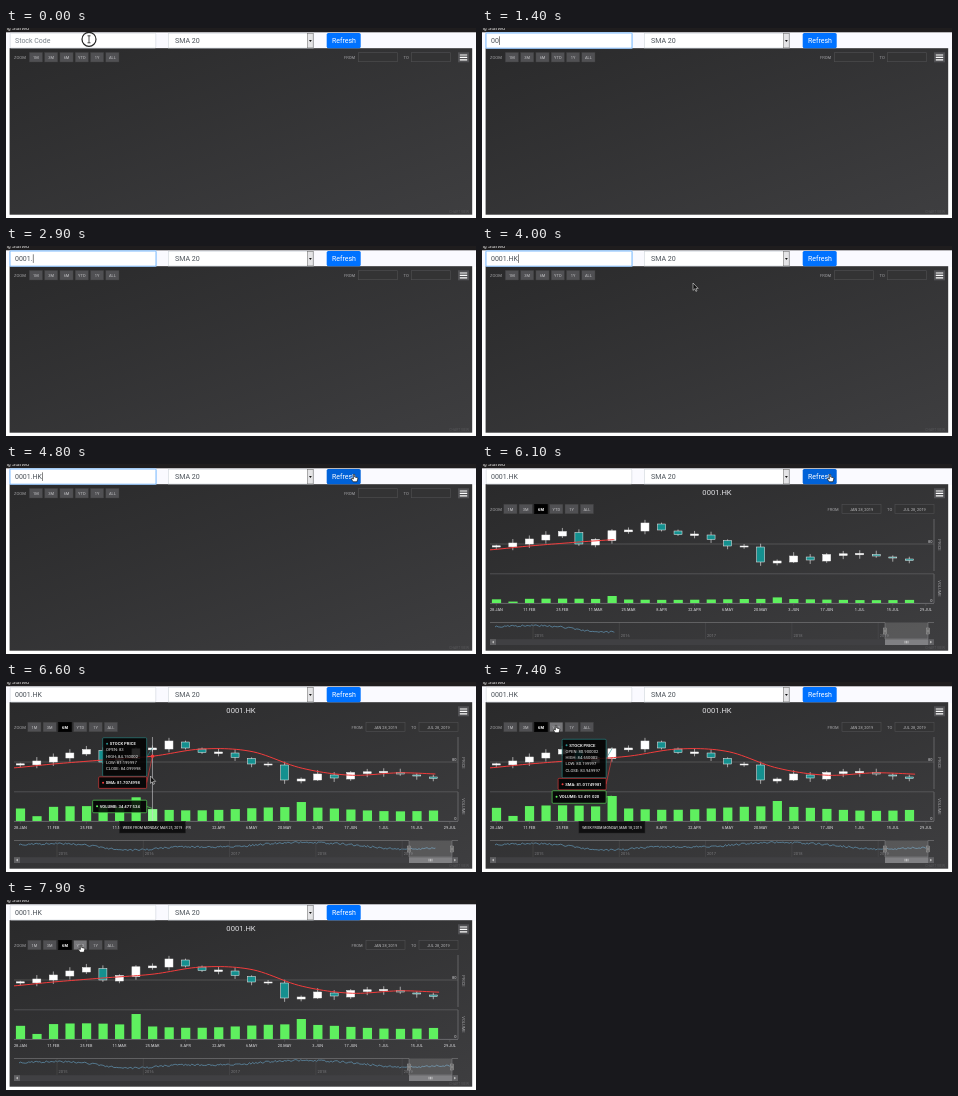
Animation, 470 px wide and 190 px high, one loop 8 s. Source, as an HTML page:

```html
<!DOCTYPE html>
<html lang="en">
<head>
<meta charset="utf-8">
<title>Stock chart</title>
<style>
  html, body { margin: 0; width: 100%; height: 100%; overflow: hidden; background: #fff; }
  svg { display: block; width: 470px; height: 190px; font-family: Roboto, "Open Sans", sans-serif; }
  text { white-space: pre; }
</style>
</head>
<body>
<svg id="stage" viewBox="0 0 470 190"></svg>
<script>
const LOOP = 8000, STEP = 100;
const stage = document.getElementById('stage');

function el(parent, tag, attrs = {}, text) {
  const node = document.createElementNS('http://www.w3.org/2000/svg', tag);
  set(node, attrs);
  if (text !== undefined) node.textContent = text;
  return parent.appendChild(node);
}
function set(node, attrs) {
  for (const key in attrs) node.setAttribute(key, attrs[key]);
}
const group = (parent, attrs) => el(parent, 'g', attrs);
const rect = (parent, x, y, width, height, fill, more) =>
  el(parent, 'rect', { x, y, width, height, fill, ...more });
const path = (parent, d, stroke, width = 0.6, fill = 'none') =>
  el(parent, 'path', { d, stroke, 'stroke-width': width, fill, 'stroke-linejoin': 'round' });
const label = (parent, x, y, size, fill, text, more) =>
  el(parent, 'text', { x, y, 'font-size': size, fill, ...more }, text);
const show = (node, on) => set(node, { visibility: on ? 'visible' : 'hidden' });
const clamp = (v, lo = 0, hi = 1) => Math.min(hi, Math.max(lo, v));
const range = (n, make) => Array.from({ length: n }, (_, i) => make(i));
const MID = { 'text-anchor': 'middle' };

// Smooth curve through evenly spaced values; k counts in spacings.
function spline(values, k) {
  const n = clamp(Math.floor(k), 0, values.length - 2), u = k - n;
  const at = i => values[clamp(i, 0, values.length - 1)];
  const [a, b, c, d] = [at(n - 1), at(n), at(n + 1), at(n + 2)];
  return b + u / 2 * (c - a + u * (2 * a - 5 * b + 4 * c - d + u * (3 * (b - c) + d - a)));
}
function random(seed) {
  return () => (seed = (seed * 16807) % 2147483647) / 2147483647;
}

/* ---------- page and form ---------- */
const defs = el(stage, 'defs');
const gradient = el(defs, 'linearGradient', { id: 'panel', x1: 0, y1: 0, x2: 1, y2: 1 });
el(gradient, 'stop', { offset: 0, 'stop-color': '#2a2a2b' });
el(gradient, 'stop', { offset: 1, 'stop-color': '#3e3e40' });
const reveal = rect(el(defs, 'clipPath', { id: 'reveal' }), 8, 50, 0, 130);

rect(stage, 0, 4, 470, 17, '#fafaff');
rect(stage, 0, 0, 470, 4.3, '#1f1d1e');
label(stage, -1, 1.6, 5.2, '#ddd', 'ng Started');
rect(stage, 3.6, 20.2, 462.6, 166.5, 'url(#panel)');

const ring = rect(stage, 3.2, 4.2, 147.6, 16.6, '#a9d2ff', { rx: 1.5 });
const field = rect(stage, 4.2, 5.2, 145.6, 14.8, '#fff', { rx: 1, 'stroke-width': 0.6 });
const fieldText = label(stage, 9, 15.2, 7, '#495057', '');
const caret = rect(stage, 0, 8.3, 0.6, 8.6, '#333');

rect(stage, 162.3, 5.2, 145, 14.8, '#fff', { stroke: '#ced4da', 'stroke-width': 0.6 });
label(stage, 169, 15.2, 7.1, '#495057', 'SMA 20');
rect(stage, 301.6, 5.3, 5.6, 14.6, '#e4e4e6', { stroke: '#777', 'stroke-width': 0.6 });
path(stage, 'M303 12h2.8l-1.4 1.9z', 'none', 0, '#111');

const button = rect(stage, 320.7, 5, 34, 15.2, '#0072ff', { rx: 1.6 });
label(stage, 337.9, 15.2, 7, '#fff', 'Refresh', MID);

/* ---------- chart toolbar ---------- */
function toolbar(parent, x, y, selected, from, dates) {
  label(parent, 8, y + 6.6, 4.2, '#a0a0a3', 'ZOOM');
  const boxes = ['1M', '3M', '6M', 'YTD', '1Y', 'ALL'].map((name, i) => {
    const on = i === selected;
    const box = rect(parent, x + i * 15.3, y, 13.2, 9.6, on ? '#000' : '#505053',
      { stroke: on ? '#000' : '#3c3c3e', 'stroke-width': 0.4 });
    label(parent, x + i * 15.3 + 6.6, y + 6.4, 4, on ? '#fff' : '#c0c0c3', name,
      { ...MID, 'font-weight': on ? 700 : 400 });
    return box;
  });
  [['FROM', from, from + 14.5], ['TO', from + 59.5, from + 67.5]].forEach(([name, tx, bx], i) => {
    label(parent, tx, y + 6.4, 4.1, '#a0a0a3', name);
    rect(parent, bx, y + 0.3, 39, 9, '#333334', { stroke: '#505053', 'stroke-width': 0.6 });
    label(parent, bx + 19.5, y + 6.4, 3.9, '#b8b8ba', dates[i], MID);
  });
  return boxes;
}
const idle = group(stage);
toolbar(idle, 23.3, 24.4, -1, 338, ['', '']);
const chart = group(stage);
const zoomBoxes = toolbar(chart, 21.8, 40.2, 2, 345.5, ['JAN 28, 2019', 'JUL 28, 2019']);

rect(stage, 452, 24.3, 11, 10, '#505053');
path(stage, 'M453.8 27h7.4M453.8 29.4h7.4M453.8 31.8h7.4', '#fff', 1.2);
label(stage, 463, 185.3, 3.4, '#58585a', 'CHART VIEW', { 'text-anchor': 'end' });

/* ---------- chart data ---------- */
const BASE = 139, PRICE_SCALE = 3.4, WEEKS = 26;
const MONTHS = ['JAN', 'FEB', 'MAR', 'APR', 'MAY', 'JUN', 'JUL'];
const noise = random(41);
const xAt = week => 14.3 + week * 16.52;
const priceAt = y => 80 + (80 - y) / PRICE_SCALE;
const dayOf = week => {
  const date = new Date(Date.UTC(2019, 0, 28 + week * 7));
  return [date.getUTCDate(), MONTHS[date.getUTCMonth()]];
};

// Heights of the weekly closes; each week opens just below the last close.
const closes = [81.8, 79, 75, 71, 67.5, 80, 75.5, 66.8, 66, 59, 66, 70.5, 70, 75.5, 82, 82,
  98, 97, 92, 96, 90.5, 89.8, 89.4, 92, 94, 96.5];
const candles = closes.map((close, i) => {
  const open = (i ? closes[i - 1] : 82) + 1;
  return {
    open, close,
    high: Math.min(open, close) - 1 - noise() * 3,
    low: Math.max(open, close) + 1 + noise() * 3
  };
});
const spikes = { 1: -9, 7: 11.4, 17: 5.4 };
const volumes = range(WEEKS, i => 14 - 0.08 * i + 2 * Math.cos((i - 4) / 2) + (spikes[i] || 0));
const smaKeys = [86.5, 82, 78, 74.2, 67, 69.5, 86, 93.2, 90.8, 92.5];
const smaY = week => spline(smaKeys, (week + 1) / 3);
const navKeys = [162.5, 162, 168, 165, 164.5, 160.5, 162, 167, 165.5];

/* ---------- chart ---------- */
label(chart, 235, 31, 7.6, '#e0e0e3', '0001.HK', MID);
path(chart, 'M8 80H452M8 109.8H452', '#707073', 0.5);
path(chart, 'M452 55V107M452 110V139', '#707073', 0.8);
path(chart, 'M8 139.4H452', '#8a8a8d', 0.6);
[['80', 78.8], ['0', 138]].forEach(([text, y]) =>
  label(chart, 450.5, y, 4, '#d0d0d3', text, { 'text-anchor': 'end' }));
[['PRICE', 81], ['VOLUME', 124.5]].forEach(([name, y]) =>
  label(chart, 0, 0, 4.2, '#a0a0a3', name, { ...MID, transform: `translate(456 ${y}) rotate(90)` }));
for (let week = 0; week <= WEEKS; week += 2) {
  label(chart, xAt(week), 147.4, 3.9, '#e0e0e3', dayOf(week).join('.'), MID);
  path(chart, `M${xAt(week)} 139.4v2.4`, '#707073', 0.4);
}

const bars = volumes.map((_, i) => rect(chart, xAt(i) - 4.4, BASE, 9.2, 0, '#5ff05f'));
candles.forEach(({ open, close, high, low }, i) => {
  const x = xAt(i);
  path(chart, `M${x} ${high}V${low}`, '#f0f0f0', 0.6);
  rect(chart, x - 4, Math.min(open, close), 8, Math.abs(close - open),
    close < open ? '#fff' : '#14908f', { stroke: '#f0f0f0', 'stroke-width': 0.5 });
});
const revealed = group(chart, { 'clip-path': 'url(#reveal)' });
const smaPoints = range(WEEKS * 4, n => `${xAt(n / 4 - 0.4)} ${smaY(n / 4 - 0.4)}`);
path(revealed, 'M' + smaPoints.join('L'), '#f23c3c', 1);

/* ---------- navigator ---------- */
for (let i = 0; i < 5; i++) {
  const x = 51 + i * 86.3;
  path(chart, `M${x} 158.5V175`, '#505053', 0.5);
  label(chart, x + 1.5, 173, 4, '#77777a', String(2015 + i));
}
rect(chart, 403, 158.5, 43, 16.5, 'rgba(255,255,255,.14)');
const navPoints = range(271, n =>
  `${13 + n * 1.6} ${spline(navKeys, n / 270 * (navKeys.length - 1)) + (noise() - 0.5) * 1.8}`);
path(revealed, 'M' + navPoints.join('L'), '#6399b8', 0.7);
path(chart, 'M8 158.5H403V175H446V158.5H452', '#8a8a8d', 0.5);
rect(chart, 8, 175.2, 444, 5.8, '#404043');
rect(chart, 403, 175.2, 43, 5.8, '#808083');
path(chart, 'M423 176.8v2.6M424.5 176.8v2.6M426 176.8v2.6', '#fff', 0.5);
[8, 446].forEach((x, i) => {
  rect(chart, x, 175.2, 6, 5.8, '#606063');
  path(chart, i ? 'M448.2 176.8l1.8 1.3l-1.8 1.3z' : 'M11.8 176.8l-1.8 1.3l1.8 1.3z', 'none', 0, '#ccc');
});
[403, 446].forEach(x => {
  rect(chart, x - 1.7, 164, 3.4, 6, '#666', { stroke: '#aaa', 'stroke-width': 0.4 });
  path(chart, `M${x - 0.5} 165.5v3M${x + 0.5} 165.5v3`, '#ccc', 0.3);
});

/* ---------- tooltip ---------- */
const crosshair = path(chart, '', '#cfcfd2', 0.6);
const dot = el(chart, 'circle', { r: 1.7, fill: '#f23c3c' });
const tip = group(chart);

function tipBox(width, height, color, lines) {
  const g = group(tip);
  const link = path(g, '', color, 0.6);
  rect(g, -width, -height / 2, width, height, 'rgba(0,0,0,.85)',
    { stroke: color, 'stroke-width': 0.6, rx: 1 });
  el(g, 'circle', { cx: 4.4 - width, cy: 6 - height / 2, r: 1, fill: color });
  const texts = range(lines, n =>
    label(g, (n ? 3.4 : 7) - width, 7.5 - height / 2 + n * 6.2, 4.2, '#e8e8e8', '',
      { 'font-weight': n ? 400 : 700 }));
  return { g, link, texts };
}
const stockTip = tipBox(44, 38.5, '#2b908f', 5);
const smaTip = tipBox(48, 11.5, '#f23c3c', 1);
const volumeTip = tipBox(54, 12.5, '#5ff05f', 1);
const dateTip = group(tip);
rect(dateTip, -33, 139.5, 66, 11.5, 'rgba(12,12,13,.9)', { stroke: '#222', 'stroke-width': 0.5 });
const dateText = label(dateTip, 0, 146.8, 3.6, '#f0f0f0', '', MID);

// Exact quotes where known; other weeks are read off the chart.
const quotes = {
  7: { ohlc: ['80.900002', '84.650002', '80.199997', '83.949997'], sma: '81.01749981', volume: '53 491 020' },
  8: { ohlc: ['83', '84.150002', '81.199997', '84.099998'], sma: '81.7074998', volume: '34 477 534' }
};
function quote(i) {
  const { open, high, low, close } = candles[i];
  return quotes[i] || {
    ohlc: [open, high, low, close].map(y => priceAt(y).toFixed(6)),
    sma: priceAt(smaY(i)).toFixed(7),
    volume: Math.round(volumes[i] * 2139641).toLocaleString('en-US').replace(/,/g, ' ')
  };
}

function drawTip(i) {
  const x = xAt(i), q = quote(i), center = Math.max(74, smaY(i) + 0.8), top = BASE - volumes[i];
  const place = (box, y, anchor, lines) => {
    set(box.g, { transform: `translate(${x - 5.8} ${y})` });
    set(box.link, { d: `M0 0L5.8 ${anchor - y}` });
    box.texts.forEach((text, n) => { text.textContent = lines[n]; });
  };
  const rows = ['OPEN', 'HIGH', 'LOW', 'CLOSE'].map((name, n) => `${name}: ${q.ohlc[n]}`);
  place(stockTip, center, candles[i].close, ['STOCK PRICE', ...rows]);
  place(smaTip, center + 25.6, smaY(i), ['SMA: ' + q.sma]);
  place(volumeTip, Math.max(center + 38.5, top - 2), top, ['VOLUME: ' + q.volume]);
  const [day, month] = dayOf(i);
  dateText.textContent = `WEEK FROM MONDAY, ${month} ${day}, 2019`;
  set(dateTip, { transform: `translate(${x} 0)` });
  set(crosshair, { d: `M${x} 55V139` });
  set(dot, { cx: x, cy: smaY(i) });
}

/* ---------- pointer ---------- */
const pointer = group(stage);
const shapes = {
  beam: group(pointer),
  arrow: path(pointer, 'M0 0V7.4L1.7 5.8L2.9 8.4L4 7.9L2.9 5.4H5.2Z', '#fff', 0.5, '#111'),
  hand: path(pointer, 'M-.7 .6Q0-.5 .7 .6V3L3.4 3.6Q4 4 3.8 5L3 7.8H-.9L-2.8 4.9Q-2.6 3.8-.7 5Z', '#111', 0.7, '#fff')
};
const halo = el(shapes.beam, 'circle', { r: 7, fill: 'none', stroke: '#222', 'stroke-width': 1.2 });
path(shapes.beam, 'M-1.5-3.5H1.5M0-3.5V3.5M-1.5 3.5H1.5', '#222', 0.8);

// Each move: start, end, target x and y.
const moves = [[1200, 1300, 211, 37], [4300, 4750, 348, 10], [6250, 6600, 144.5, 94],
  [6600, 7100, 128, 50], [7100, 7350, 74, 43], [7500, 7800, 75, 44.5]];
function pointerAt(t) {
  return moves.reduce(([x, y], [from, to, tx, ty]) => {
    const k = clamp((t - from) / (to - from));
    return [x + (tx - x) * k, y + (ty - y) * k];
  }, [83, 11.3]);
}
const typing = { 1200: '0', 1400: '0', 1600: '0', 1900: '1', 2900: '.', 3300: 'H', 3600: 'K' };
const FOCUS = 100, BLUR = 5200, LOAD = 5500, GROW = 5745, HOVER = 6350, LEAVE = 7050, HIDE = 7550;

function renderForm(t) {
  const times = Object.keys(typing).map(Number).filter(at => at <= t);
  const typed = times.map(at => typing[at]).join('');
  const focused = t >= FOCUS && t < BLUR;
  const focus = focused ? clamp((t - FOCUS + 50) / 150) : 0;
  fieldText.textContent = typed || 'Stock Code';
  set(fieldText, { fill: typed ? '#495057' : '#7b838a' });
  set(ring, { opacity: focus });
  set(field, { stroke: focus > 0.5 ? '#80bdff' : '#ced4da' });
  show(caret, focused && (t - (times.pop() || FOCUS)) % 1000 < 500);
  set(caret, { x: typed ? 9.3 + fieldText.getComputedTextLength() : 9 });
}

function renderPointer(t, px, py) {
  const inside = (x, y, w, h) => px >= x && px <= x + w && py >= y && py <= y + h;
  const onButton = inside(320, 4, 35, 16), onZoom = inside(67.7, 40, 13.2, 10);
  const kind = t < 1200 ? 'beam' : onButton || onZoom ? 'hand' : 'arrow';
  const fade = clamp((t - FOCUS) / 200);
  set(pointer, { transform: `translate(${px} ${py})` });
  for (const name in shapes) show(shapes[name], name === kind && (t < 1200 || t >= 3900));
  set(halo, { r: 7 - fade * 5, opacity: 1 - fade });
  set(button, { fill: onButton ? '#0062d9' : '#0072ff' });
  set(zoomBoxes[3], { fill: onZoom ? '#77777a' : '#505053' });
}

function renderChart(t, py) {
  const grow = (1 - Math.cos(Math.PI * clamp((t - GROW) / 1000))) / 2;
  const hovering = t >= HOVER && t < LEAVE && py >= 55;
  const tipOn = hovering || (t >= LEAVE && t < HIDE + 150);
  const [hoverX] = pointerAt(Math.min(t, LEAVE));
  const week = clamp(Math.round((hoverX - xAt(0)) / 16.52), 0, WEEKS - 1);
  set(reveal, { width: 444 * grow });
  bars.forEach((bar, i) => {
    const height = volumes[i] * grow;
    set(bar, { y: BASE - height, height, fill: hovering && i === week ? '#8dff8d' : '#5ff05f' });
  });
  show(crosshair, hovering);
  show(dot, hovering);
  show(tip, tipOn);
  set(tip, { opacity: 1 - clamp((t - HIDE) / 150) });
  if (tipOn) drawTip(week);
}

function render(t) {
  const [px, py] = pointerAt(t), loaded = t >= LOAD;
  renderForm(t);
  renderPointer(t, px, py);
  set(chart, { display: loaded ? 'inline' : 'none' });
  show(idle, !loaded);
  if (loaded) renderChart(t, py);
}

const start = performance.now();
function tick() {
  const t = (performance.now() - start) % LOOP;
  render(Math.floor(t / STEP) * STEP);
  requestAnimationFrame(tick);
}
tick();
</script>
</body>
</html>
```
